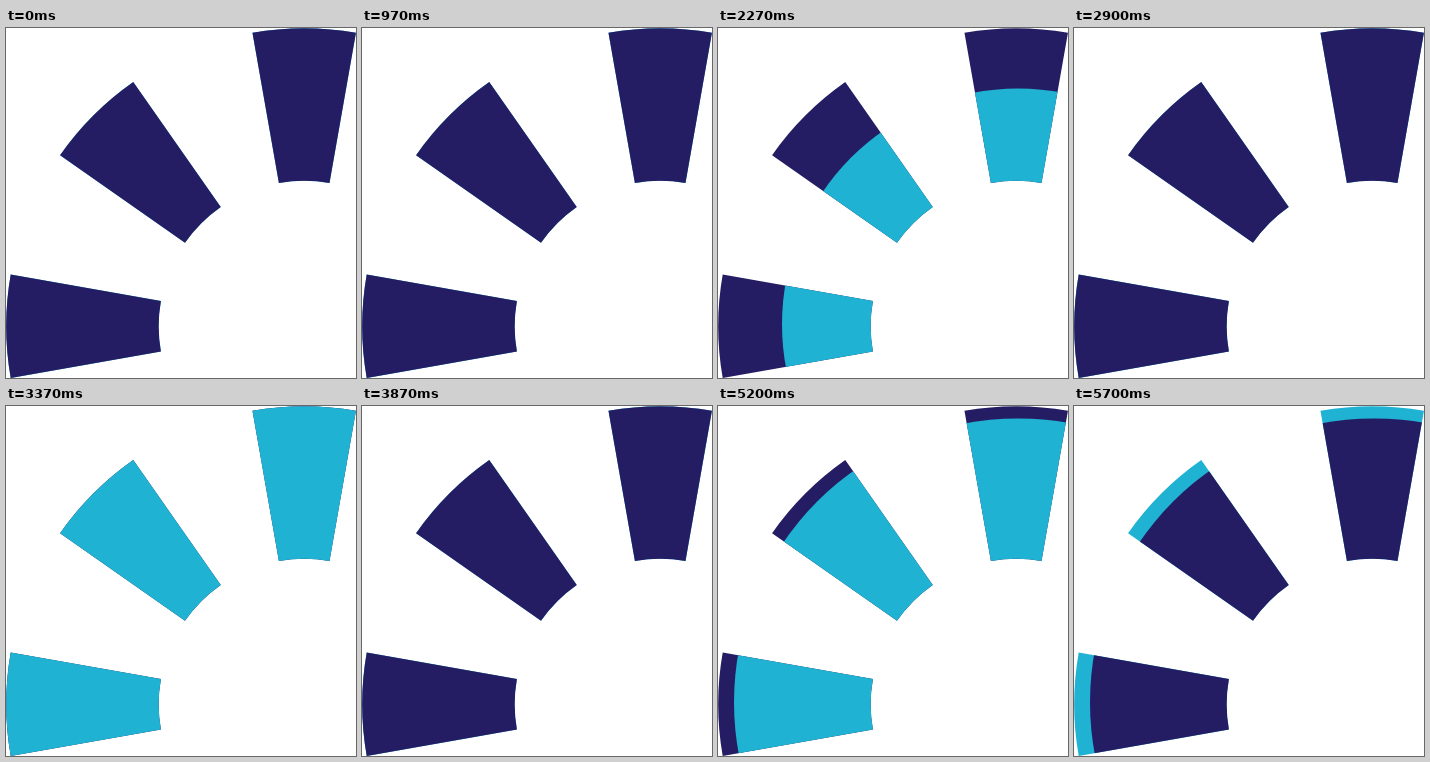
Write an HTML page that moves like this. It is 350 by 350 pixels and loops after 5730 ms.

```html
<!DOCTYPE html>
<html lang="en">
<head>
<meta charset="utf-8">
<title>Rays</title>
<style>
  html, body { margin: 0; width: 100%; height: 100%; overflow: hidden; background: #fff; }
  svg { display: block; width: 100vw; height: 100vh; }
</style>
</head>
<body>
<svg viewBox="0 0 350 350">
  <clipPath id="rays">
    <path id="ray" d="M246.45 4.7A298 298 0 0 1 349.95 4.7L323.5 154.9A145.5 145.5 0 0 0 272.9 154.9Z"/>
    <use href="#ray" transform="rotate(-45 298.2 298.2)"/>
    <use href="#ray" transform="rotate(-90 298.2 298.2)"/>
  </clipPath>
  <g clip-path="url(#rays)">
    <rect id="back" width="350" height="350"/>
    <circle id="wave" cx="300" cy="296.4"/>
  </g>
</svg>
<script>
const LOOP = 5730;
const COLORS = ['#241d63', '#1fb2d2'];
const back = document.getElementById('back');
const wave = document.getElementById('wave');

// Steps come every 80 ms, snapped to a 30 Hz clock and rounded to 10 ms.
const stepTime = k => Math.round(Math.floor((40 + 12 * k) / 5) / 0.3) * 10;

function draw(t) {
  let k = -1;
  while (stepTime(k + 1) <= t) k++;
  const turn = Math.floor(k / 6);   // each wave: four growing steps, then a hold
  const step = k - turn * 6;
  back.setAttribute('fill', COLORS[turn & 1]);
  wave.setAttribute('fill', COLORS[(turn + 1) & 1]);
  wave.setAttribute('r', 188 + 48 * step);
}

const start = performance.now();
function tick() {
  draw((performance.now() - start) % LOOP);
  requestAnimationFrame(tick);
}
tick();
</script>
</body>
</html>
```
